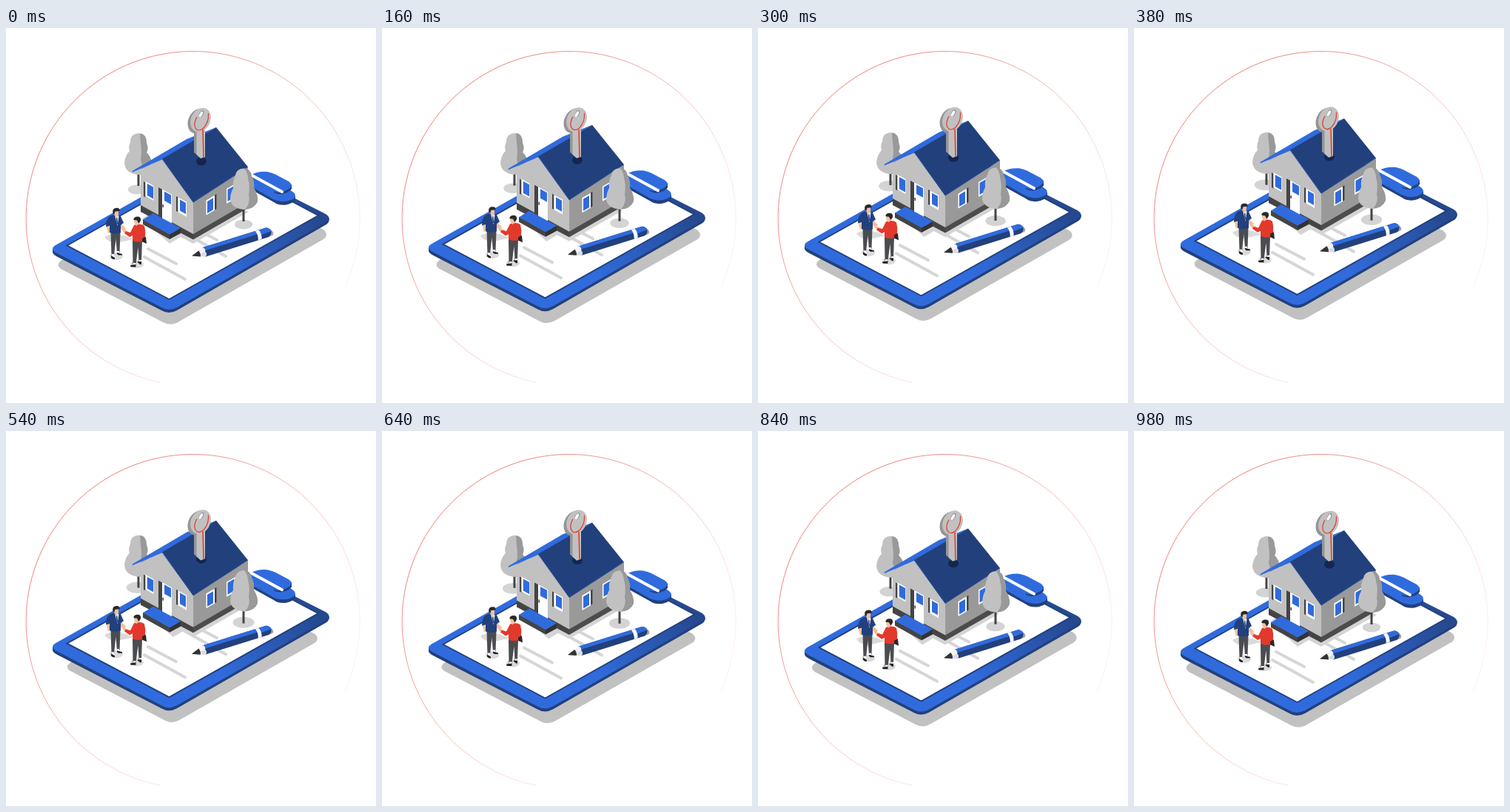
Animation of 500x506 px, one loop 1000 ms. Source, as an HTML page:

```html
<!DOCTYPE html>
<html lang="en">
<head>
<meta charset="utf-8">
<title>House on a clipboard</title>
<style>
html, body { margin: 0; width: 100%; height: 100%; overflow: hidden; background: #fff; }
svg { display: block; width: 100vw; height: 100vh; }
</style>
</head>
<body>
<svg viewBox="0 0 500 506">
  <defs>
    <linearGradient id="ringFade" gradientUnits="userSpaceOnUse" x1="110" y1="110" x2="385" y2="385">
      <stop offset="0" stop-color="#e4483c" stop-opacity=".68"/>
      <stop offset=".3" stop-color="#e4483c" stop-opacity=".5"/>
      <stop offset=".7" stop-color="#e4483c" stop-opacity=".2"/>
      <stop offset="1" stop-color="#e4483c" stop-opacity=".08"/>
    </linearGradient>
    <linearGradient id="rim" gradientUnits="userSpaceOnUse" x1="290" y1="335" x2="415" y2="240">
      <stop offset="0" stop-color="#306bdd"/>
      <stop offset="1" stop-color="#25488e"/>
    </linearGradient>
  </defs>

  <path d="M208 478A225.500 225.500 0 1 1 458 350" fill="none" stroke="url(#ringFade)"/>

  <path id="shadow" fill="#c1c1c1" d="M74 314L272 200Q281 195 290 200L429 272Q437 279 429 285L234 396Q223 403 212 397L74 325Q67 320 74 314Z"/>

  <g class="board">
    <path fill="#22407c" d="M63 298V303Q64 306 70 309L210 381Q220 387 231 381L433 265Q437 262 437 257Z"/>
    <path fill="url(#rim)" d="M67 293L270 179Q280 173 290 179L432 251Q441 257 432 262L231 377Q220 383 210 377L67 303Q59 298 67 293Z"/>
    <path fill="#fff" stroke="#22407c" stroke-width="1.900" d="M82.500 293.500L285 180L422 253L220.500 366Z"/>
    <path d="M192 298L230 318M187 309L242 339M247 266L285 286M242 277L297 308" stroke="#d6d6d6" stroke-width="4" stroke-linecap="round"/>
    <path fill="#22407c" d="M326 206L391 227V232Q388 236 379 238.500Q369 240 362 235L326 215Z"/>
    <path fill="#306bdd" d="M326 200L376 213L386 220Q394 225 389 230Q381 235 371 234Q365 233 361 231L326 211Z"/>
    <path fill="#22407c" d="M362 215L386 211V217Q383 222 373 224Q368 225 362 222Z"/>
    <path fill="#306bdd" d="M329 199Q340 193 353 194Q359 195 364 197.500L382 207Q389 212 383 216.500Q376 221.500 366 222L326 203Z"/>
    <path d="M327 196L373 221" stroke="#fff" stroke-width="4" stroke-linecap="round"/>
    <ellipse class="treeShade" cx="177" cy="218" fill="#d4d4d4"/>
    <ellipse class="treeShade" cx="321" cy="265" fill="#d4d4d4"/>
    <path id="houseShade" fill="#d4d4d4" d="M184 257L221 291L236 282L253 291L328 248L250 215Z"/>
  </g>

  <g id="backTree"></g>
  <g id="house"></g>
  <ellipse class="board" cx="264" cy="180" rx="7" ry="5.500" fill="#14264f"/>

  <g class="still">
    <path fill="#959595" d="M254 135H262V174L254 168Z"/>
    <ellipse cx="259.500" cy="125.500" rx="13" ry="17.500" transform="rotate(26 259.500 125.500)" fill="#959595"/>
    <path fill="#c1c1c1" d="M257.500 136H269V174L263 176L257.500 171Z"/>
    <ellipse cx="263" cy="124" rx="13" ry="17" transform="rotate(26 263 124)" fill="#c1c1c1"/>
    <ellipse cx="264" cy="116" rx="2.800" ry="5.200" transform="rotate(26 264 116)" fill="#959595"/>
    <ellipse cx="263.500" cy="116.500" rx="1.900" ry="4.300" transform="rotate(26 263.500 116.500)" fill="#fff"/>
    <path fill="none" stroke="#e3392c" stroke-width="1.200" d="M258 120Q253 129 256 135Q260 141 267 135Q274 127 273.500 117V115"/>
    <path stroke="#e3392c" stroke-width="1.500" d="M266 137L267 174.500"/>
  </g>

  <g id="frontTree"></g>

  <g class="board">
    <path fill="#a5a5a5" d="M251 308L300 296L357 272Q364 276 360 280L268 308Z"/>
    <g transform="translate(251 307.500) rotate(-17.300)">
      <path fill="#22407c" d="M17 -6.500H107Q112 -5 112.500 0Q112 5 107 6.500H17Z"/>
      <path fill="#306bdd" d="M17 -6.500H107Q112 -5 112.500 0L96 1V-1.500H17Z"/>
      <path fill="#f4f4f6" d="M10 -3.500L18 -6.500Q21 -3 19 0Q21 3 18 6.500L10 4Z"/>
      <path fill="#dcdce4" d="M10 1L19 0Q21 3 18 6.500L10 4Z"/>
      <path fill="#333" d="M0 0L11 -4Q13 0 11 4.500Z"/>
      <path fill="#fff" d="M92 -6.500H97Q99.500 0 97 6.500H92Q94.500 0 92 -6.500Z"/>
    </g>

    <g fill="#dadada">
      <path d="M133 282Q142 276 160 280L172 285L150 290Q137 289 133 282Z"/>
      <ellipse cx="149" cy="308" rx="9" ry="5"/>
      <ellipse cx="177" cy="319" rx="9" ry="5"/>
    </g>
    <g>
      <path fill="#4a4c50" d="M141.500 275H154.500L153.500 303H150L148.500 284L146 307H142.500Z"/>
      <path fill="#fff" d="M142.500 305H146L146.500 309H143ZM150 301H153V304H150Z"/>
      <path fill="#222" d="M142 307L147 310V312H144.500L142 310ZM150 303L157 305V306.500H152L150 305Z"/>
      <path fill="#f4bf9d" d="M135 266L138.500 265L141 275L138 277ZM155 264L162 270L160 275L154 270Z"/>
      <path fill="#22407c" d="M140 254Q148 250 155 254L159 263L155 266L155 276Q147 279 140 276L140 267L135 268Q135 258 140 254Z"/>
      <path fill="#fff" d="M147 252L152.500 253.500L150.500 267Z"/>
      <path fill="#22407c" d="M149 256H150.500L151 264L149.500 266Z"/>
      <path fill="#f4bf9d" d="M146 247H152V252L150 256L146.500 253Z"/>
      <path fill="#292929" d="M144.500 250Q143 244 148 243Q154 242 153.500 247L147.500 247.500L146.500 251Z"/>
    </g>
    <g>
      <path fill="#4a4c50" d="M171 287H184L183 316H179.500L178.500 296L175.500 319H171.500Z"/>
      <path fill="#fff" d="M172 317H175.500V320H172ZM180 313H183V316H180Z"/>
      <path fill="#222" d="M175.500 319V322.500H169Q167 321 169 320ZM183 315V319H181L177 315.500Z"/>
      <path fill="#292929" d="M182 279L189 282L190 291L183 288Z"/>
      <path fill="#f4bf9d" d="M157 269L162 273L163 278L158 275Z"/>
      <path fill="#e3392c" d="M173 266Q182 263 187 267Q189 274 188 282L184 284L184 288Q177 290 171 287L171 280L167 282L160 277L162 274L168 276Z"/>
      <path fill="#f4bf9d" d="M173 259H179V265L176 267L173.500 263Z"/>
      <path fill="#292929" d="M172.500 259Q172 255 177 254.500Q183 254 182 260L179.500 264L177 259.500Z"/>
    </g>
  </g>
</svg>
<script>
const BLUE = "#306bdd", NAVY = "#22407c", LIGHT = "#c1c1c1", MID = "#999", DARK = "#444";
const LOOP = 1000, STEP = 20, CYCLE = 980;
const all = s => [...document.querySelectorAll(s)];
const byId = id => document.getElementById(id);
const shape = (fill, d) => `<path fill="${fill}" d="${d}"/>`;

// Upright wall panel whose top and bottom edges follow the wall's slope.
const panel = (fill, x, y, w, h, slope) =>
  shape(fill, `M${x} ${y}l${w} ${w * slope}v${h}l${-w} ${-w * slope}z`);
const left = (fill, x, y, w, h) => panel(fill, x, y, w, h, 0.55);
const right = (fill, x, y, w, h) => panel(fill, x, y, w, h, -0.58);

function house() {
  return [
    shape(LIGHT, "M182 191L211 176L253 234V279L182 240Z"),
    shape(MID, "M253 234L327 188V236L253 279Z"),
    shape(DARK, "M182 239L253 278V285.500L182 248Z"),
    shape("#4c4c4c", "M253 278L327 235V243L253 285.500Z"),
    left(DARK, 186, 207, 2.5, 20), left("#fff", 188.5, 207, 11, 20), left(BLUE, 190.8, 210, 8.2, 16),
    left(DARK, 206, 215, 5, 40), left("#fff", 211, 217.5, 13, 41), left(BLUE, 214, 220.5, 9, 12.5),
    shape(DARK, "M211.500 238h1.500v4h-1.500z"),
    left(DARK, 230, 227, 2.5, 20), left("#fff", 232.5, 228.5, 11.5, 20), left(BLUE, 235, 231.5, 8, 15),
    right("#fff", 270.5, 232.5, 12, 20), right(BLUE, 272, 234, 8, 16), right(DARK, 282, 225.5, 2.5, 20),
    right("#fff", 298, 217, 12, 20), right(BLUE, 299.5, 218, 9, 16),
    shape(DARK, "M185 258L221 278V285L185 265Z"),
    shape("#333", "M221 278L236 270V277L221 285Z"),
    shape(BLUE, "M185 258.500L199 250L236 270L221 278.500Z"),
    shape(BLUE, "M170.500 193L244 150L284 134L211 177.500L171 194.500Z"),
    shape(NAVY, "M211 176.500L284 134L327 187.500L253 235.500Z"),
    `<path d="M211 177L253 235L327 187.500" fill="none" stroke="#2a52a6" stroke-width=".8"/>`
  ].join("");
}

// Trunk, pale crown, then the shaded right half of the crown.
function tree(x, foot, trunkTop, crown, shade) {
  return `<path d="M${x} ${trunkTop}V${foot}" stroke="${DARK}" stroke-width="3"/>` +
    shape(LIGHT, crown) + shape(MID, shade);
}

byId("house").innerHTML = house();
byId("backTree").innerHTML = tree(179, 213, 190,
  "M179 142Q190 143 190 155Q193 163 190 168Q197 174 196 184Q193 198 178 198Q161 196 160 182Q161 172 167 166Q165 160 168 154Q168 143 179 142Z",
  "M181 142.200Q190 143 190 155Q193 163 190 168Q197 174 196 184Q193 196 181 198Q186 188 182 178Q184 166 182 156Z");
byId("frontTree").innerHTML = tree(321, 261, 236,
  "M321 189.500Q331 190 332 200Q336 207 335 216Q341 226 340 234Q336 244 321 245Q305 243 303 232Q303 223 307 216Q306 206 310 199Q311 190 321 189.500Z",
  "M322 189.500Q331 190 332 200Q336 207 335 216Q341 226 340 234Q336 244 323 245Q331 236 328 225Q330 212 327 203Q327 196 322 189.500Z");

const boards = all(".board"), stills = [...all(".still"), byId("backTree"), byId("frontTree")];
const shades = all(".treeShade");
const lift = (el, dy) => el.setAttribute("transform", `translate(0 ${-dy})`);
const scaleAt = (el, x, y, k) =>
  el.setAttribute("transform", `translate(${x} ${y}) scale(${k}) translate(${-x} ${-y})`);

function draw(ms) {
  const t = Math.floor((ms % LOOP) / STEP) * STEP;
  const rise = (1 - Math.cos(2 * Math.PI * t / CYCLE)) / 2;
  boards.forEach(el => lift(el, 7 * rise));
  stills.forEach(el => lift(el, 1.5 * rise));
  lift(byId("house"), 13.5 * rise);
  scaleAt(byId("shadow"), 252, 299.5, 1 - 0.069 * rise);
  scaleAt(byId("houseShade"), 252, 252, 1 - 0.16 * rise);
  shades.forEach(el => {
    el.setAttribute("rx", 12.2 + 2.3 * rise);
    el.setAttribute("ry", 6.5 + rise);
  });
}

const start = performance.now();
function tick() {
  draw(performance.now() - start);
  requestAnimationFrame(tick);
}
draw(0);
requestAnimationFrame(tick);
</script>
</body>
</html>
```
